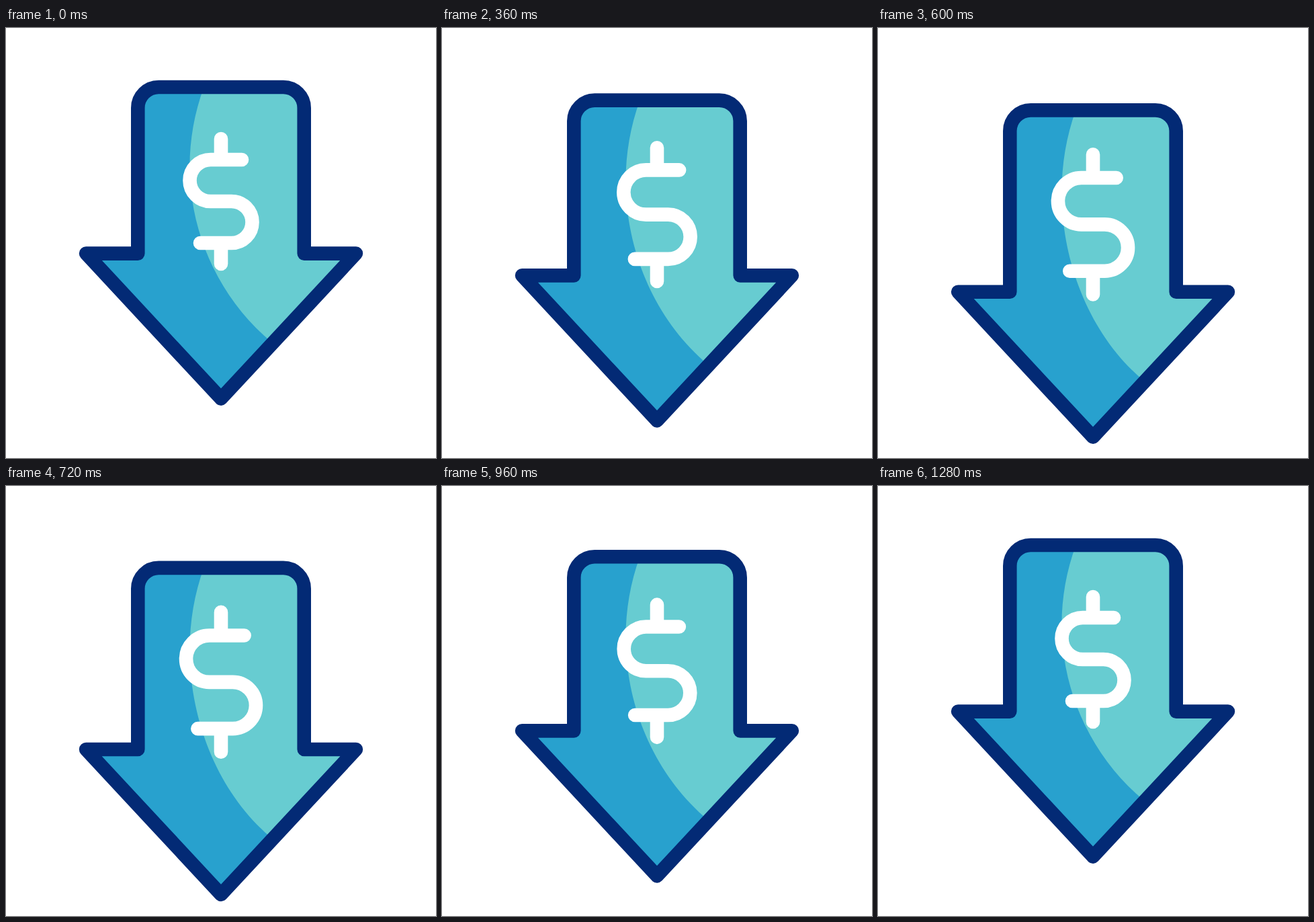
An HTML page for the animation above (1.44 s loop, 640x640 px).

```html
<!DOCTYPE html>
<html lang="en">
<head>
<meta charset="utf-8">
<title>Price drop arrow</title>
<style>
  html, body { margin: 0; height: 100%; overflow: hidden; background: #fff; }
  svg { display: block; width: 100vw; height: 100vh; }
  path { stroke-width: 20.6; stroke-linecap: round; stroke-linejoin: round; }
</style>
</head>
<body>
<svg viewBox="0 0 640 640">
  <path id="body" fill="#67ccd1"/>
  <path id="shade" fill="#28a1ce"/>
  <path id="outline" fill="none" stroke="#032a75"/>
  <path id="dollar" fill="none" stroke="#fff" vector-effect="non-scaling-stroke"
    d="M31-62H-15.5a31 31 0 0 0 0 62H15.5a31 31 0 0 1 0 62H-31M0-93V-62M0 62V93"/>
</svg>
<script>
const LOOP = 1440, STEP = 40, START = 44, PEAK = 640, END = 1280;
const DROP = 57.5, TOP_RATIO = 0.6, GROWTH = 0.12;
const [body, shade, outline, dollar] =
  ['body', 'shade', 'outline', 'dollar'].map(id => document.getElementById(id));

// Symmetric cubic-bezier(.57, 0, .43, 1), solved by bisection
function ease(x) {
  if (x <= 0) return 0;
  if (x >= 1) return 1;
  let lo = 0, hi = 1, s;
  for (let i = 0; i < 30; i++) {
    s = (lo + hi) / 2;
    const r = 1 - s;
    if (3 * s * r * (0.57 * r + 0.43 * s) + s ** 3 < x) lo = s;
    else hi = s;
  }
  return s * s * (3 - 2 * s);
}

function draw(progress) {
  const low = DROP * progress, high = low * TOP_RATIO;
  const top = 88 + high, side = top + 30.9, wing = 335.6 + low, tip = 551.6 + low;
  const left = `L320 ${tip}L119.1 ${wing}H196.3V${side}a30.9 30.9 0 0 1 30.9-30.9`;
  const arrow = `M227.2 ${top}H412.8a30.9 30.9 0 0 1 30.9 30.9V${wing}H520.9${left}Z`;
  body.setAttribute('d', arrow);
  outline.setAttribute('d', arrow);
  shade.setAttribute('d', `M294.5 ${top}C244.7 ${top + 135.3} 285.2 ${wing + 39.7} 395.7 ${wing + 132.4}${left}Z`);
  dollar.setAttribute('transform', `translate(320 ${258 + high}) scale(${1 + GROWTH * progress})`);
}

function frame(now) {
  const t = Math.floor(now / STEP + 0.05) * STEP % LOOP;
  draw(t < PEAK ? ease((t - START) / (PEAK - START)) : 1 - ease((t - PEAK) / (END - PEAK)));
  requestAnimationFrame(frame);
}
frame(0);
</script>
</body>
</html>
```
